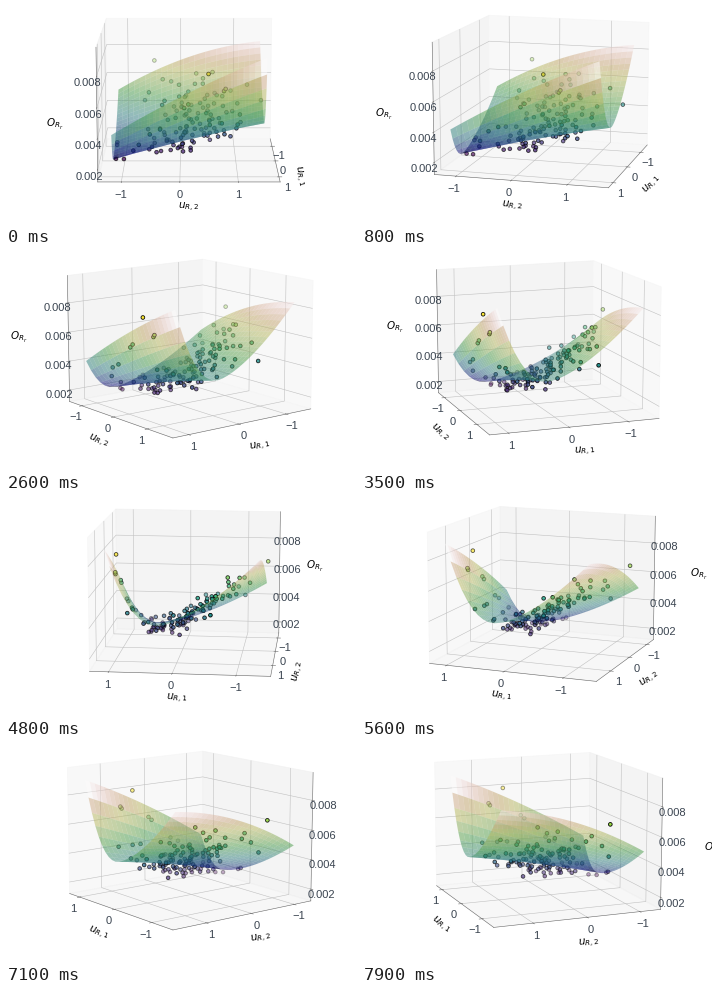
Animation, 350 px wide and 218 px high, one loop 8 s. Source, as a matplotlib script:

```python
import numpy as np
import matplotlib.pyplot as plt
from matplotlib.animation import FuncAnimation

W, H, DPI = 350, 218, 50
FRAMES, INTERVAL = 80, 100
ELEV = 12
SIDE = 269.5
LINE, TEXT = "0.4", "#3a4450"

plt.rcParams.update({
    "font.family": "Liberation Sans",
    "font.size": 16,
    "axes.labelsize": 15,
    "mathtext.fontset": "dejavusans",
    "grid.color": "#c0c0c0",
})


def bend(start, mid, end, t):
    """Parabola through three heights at t = -1, 0 and 1."""
    return mid + (end - start) / 2 * t + ((start + end) / 2 - mid) * t**2


def height(s, t):
    """Valley between a gentle and a steep wall, over [-1, 1] x [-1, 1]."""
    low = 0.42 - 0.11 * t
    floor = bend(-0.374, -0.25, -0.15, t)
    gentle = bend(-0.06, 0.18, 0.295, t)
    steep = bend(-0.153, 0.13, 0.362, t)
    left = np.clip((low - s) / (low + 1), 0, 1.2) ** 1.5
    right = np.clip((s - low) / (1 - low), 0, 1.2) ** 2.2
    return floor + (gentle - floor) * left + (steep - floor) * right


def to_data(s, t, h):
    return -0.117 + 1.214 * s, 0.156 + 1.332 * t, 0.00553 + 0.00969 * h


def sample_points(n=130):
    rng = np.random.default_rng(4)
    s = np.clip(rng.normal(0.06, 0.41, n), -0.98, 0.93)
    t = np.clip(rng.normal(-0.04, 0.38, n), -0.97, 0.95)
    h = height(s, t) + rng.normal(-0.01, 0.035, n)
    # three points that stand clear of the cloud
    s[:3], t[:3], h[:3] = (0.95, -0.38, -1.04), (0.25, 0.99, -0.49), (0.25, -0.07, 0.15)
    return s, t, h


fig = plt.figure(figsize=(W / DPI, H / DPI), dpi=DPI, facecolor="white")
ax = fig.add_axes([44.6 / W, -10.5 / H, SIDE / W, SIDE / H], projection="3d")
ax.patch.set_visible(False)

grid = np.linspace(-1, 1, 27)
S, T = np.meshgrid(grid, grid)
ax.plot_surface(*to_data(S, T, height(S, T)), cmap="gist_earth", alpha=0.5,
                rstride=1, cstride=1, linewidth=0)

px, py, pz = to_data(*sample_points())
ax.scatter(px, py, pz, c=pz, cmap="viridis", s=28, edgecolors="black",
           linewidths=1.2)

ax.set_xlim(-1.537, 1.303)
ax.set_ylim(-1.402, 1.714)
ax.set_zlim(0.0012, 0.00986)
ax.set_xticks([-1, 0, 1])
ax.set_yticks([-1, 0, 1])
ax.set_zticks([0.002, 0.004, 0.006, 0.008])
ax.tick_params(pad=0.8, color=LINE, labelcolor=TEXT)
for axis, shade in ((ax.xaxis, 0.95), (ax.yaxis, 0.92), (ax.zaxis, 0.94)):
    axis.set_pane_color((shade, shade, shade, 0.5))
    axis.line.set_color(LINE)

ax.set_xlabel("$u_{R,1}$", labelpad=7)
ax.set_ylabel("$u_{R,2}$", labelpad=7)
ax.zaxis.set_rotate_label(False)
ax.set_zlabel("$O_{R_r}$", labelpad=21.5, rotation=0)


def update(i):
    # two degrees per step, kept just off the exact quarter turns
    ax.view_init(elev=ELEV, azim=0.01 + 1.9995 * i)
    return []


anim = FuncAnimation(fig, update, frames=FRAMES, interval=INTERVAL,
                     init_func=lambda: update(0), repeat=True,
                     repeat_delay=0, blit=False)
plt.show()
```
